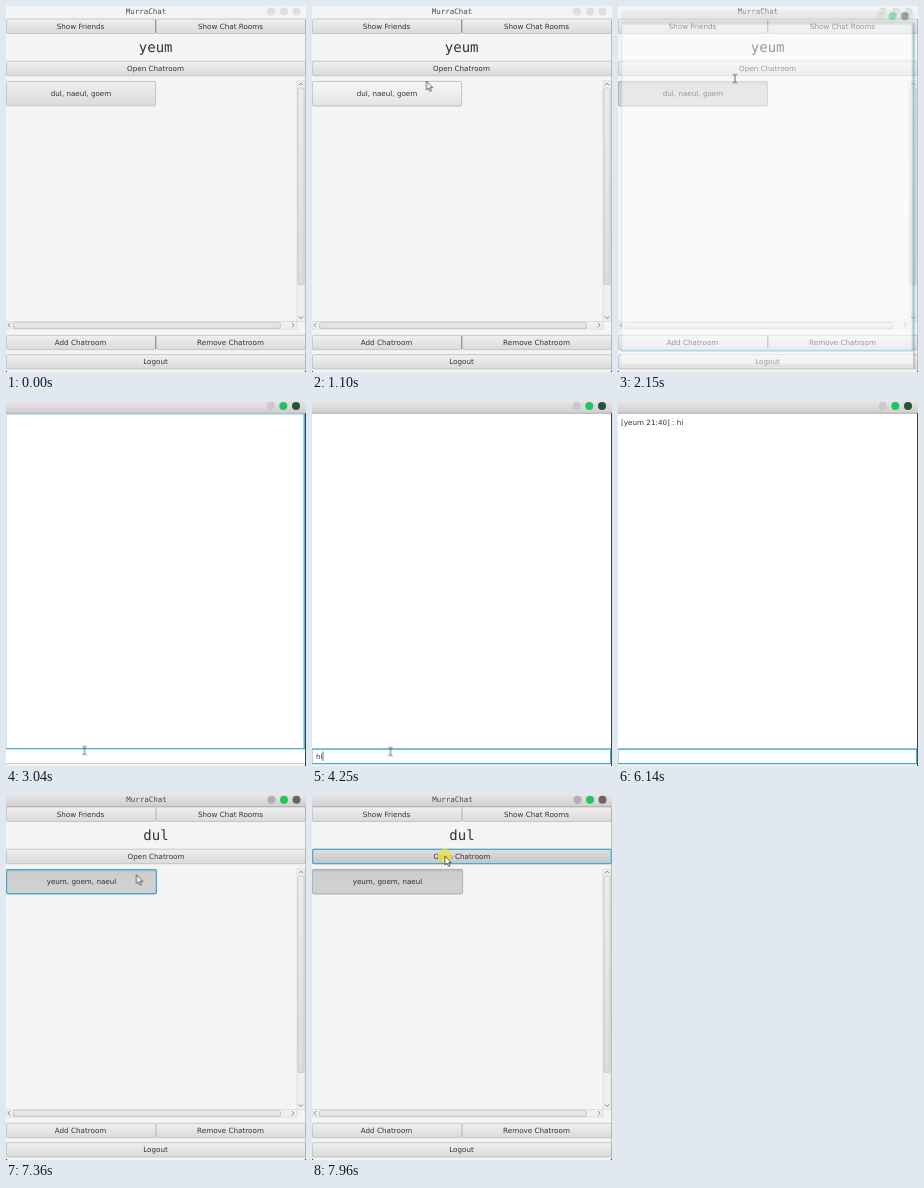
Recreate the animation shown at these times as an HTML page. Size 300x366 px, loop 8000 ms.

```html
<!DOCTYPE html>
<html lang="en">
<head>
<meta charset="utf-8">
<title>Chat demo</title>
<style>
  html, body { margin: 0; width: 100%; height: 100%; overflow: hidden; background: #f4f4f4; }
  svg { display: block; width: 300px; height: 366px; }
  text { font: 7.2px "DejaVu Sans", sans-serif; fill: #333; text-rendering: geometricPrecision; }
  .mid { text-anchor: middle; }
  .title { font: 7.5px "DejaVu Sans Mono", monospace; fill: #4c4c4c; }
  .name { font: 14px "DejaVu Sans Mono", monospace; }
  .btn { fill: url(#face); stroke: #bcbcbc; stroke-width: .8; }
  .down { fill: url(#pressed); stroke: #a6a6a6; stroke-width: .8; }
  .ring { fill: none; stroke: #45a9d0; stroke-width: 1.2; }
  .thumb { fill: url(#knob); stroke: #bdbdbd; stroke-width: .7; }
  .arrows { fill: none; stroke: #8a8a8a; stroke-width: 1; }

  /* Every part shares one 8 s clock; 1% is 80 ms. */
  .flip, .move { animation: 8s infinite; }
  .flip { opacity: 0; animation-timing-function: step-end; }
  .move { animation-timing-function: linear; }

  #second { animation-name: second; }
  #chat { animation-name: chat; transform-origin: 150px 183px; }
  #cursor { animation-name: path; }
  .active1 { animation-name: active1; }
  .hover1 { animation-name: hover1; }
  .sel1 { animation-name: sel1; }
  .selring1 { animation-name: selring1; }
  .open1 { animation-name: open1; }
  .sel2 { animation-name: sel2; }
  .selring2 { animation-name: selring2; }
  .open2 { animation-name: open2; }
  .area { animation-name: area; }
  .field { animation-name: field; }
  .caret { animation-name: caret; }
  .h { animation-name: h; }
  .i { animation-name: i; }
  .sent { animation-name: sent; }
  .click { animation-name: click; }
  .arrow { animation-name: arrow; }
  .beam { animation-name: beam; }

  @keyframes second { 0% { opacity: 0 } 77% { opacity: 1 } }
  @keyframes active1 { 0% { opacity: 0 } 16.25% { opacity: 1 } 25.75% { opacity: 0 } }
  @keyframes hover1 { 0% { opacity: 0 } 10% { opacity: 1 } 16.25% { opacity: 0 } }
  @keyframes sel1 { 0% { opacity: 0 } 16.25% { opacity: 1 } }
  @keyframes selring1 { 0% { opacity: 0 } 16.25% { opacity: 1 } 23.125% { opacity: 0 } }
  @keyframes open1 { 0% { opacity: 0 } 23.125% { opacity: 1 } 25.75% { opacity: 0 } }
  @keyframes sel2 { 0% { opacity: 0 } 89.875% { opacity: 1 } }
  @keyframes selring2 { 0% { opacity: 0 } 89.875% { opacity: 1 } 98.5% { opacity: 0 } }
  @keyframes open2 { 0% { opacity: 0 } 98.5% { opacity: 1 } }
  @keyframes area { 0% { opacity: 1 } 40% { opacity: 0 } }
  @keyframes field { 0% { opacity: 0 } 40% { opacity: 1 } }
  @keyframes h { 0% { opacity: 0 } 49.5% { opacity: 1 } 58.25% { opacity: 0 } }
  @keyframes i { 0% { opacity: 0 } 53.125% { opacity: 1 } 58.25% { opacity: 0 } }
  @keyframes sent { 0% { opacity: 0 } 58.25% { opacity: 1 } }
  @keyframes caret {
    0% { opacity: 0; transform: none }
    40% { opacity: 1; transform: none }
    46.25% { opacity: 0; transform: none }
    49.5% { opacity: 1; transform: translateX(4.6px) }
    53.125% { opacity: 1; transform: translateX(6.6px) }
    58.25% { opacity: 1; transform: none }
    64.5% { opacity: 0; transform: none }
    70.625% { opacity: 1; transform: none }
    76.75% { opacity: 0; transform: none }
  }
  @keyframes chat {
    0%, 25.75% { opacity: 0; transform: scale(.954) }
    28%, 77% { opacity: 1; transform: none }
    79.5%, 100% { opacity: 0; transform: scale(.954) }
  }
  @keyframes click {
    0% { opacity: 0 } 16.25% { opacity: 1 } 18.5% { opacity: 0 }
    23.125% { opacity: 1 } 25.25% { opacity: 0 }
    40% { opacity: 1 } 41.375% { opacity: 0 }
    89.875% { opacity: 1 } 91.75% { opacity: 0 } 98.5% { opacity: 1 }
  }
  @keyframes arrow { 0% { opacity: 1 } 26.25% { opacity: 0 } 77% { opacity: 1 } }
  @keyframes beam { 0% { opacity: 0 } 26.25% { opacity: 1 } 77% { opacity: 0 } }
  @keyframes path {
    0%, .375% { transform: translate(306px, 350px) }
    5% { transform: translate(205px, 205px) }
    10.375% { transform: translate(119px, 84px) }
    13.75% { transform: translate(114.5px, 75px) }
    15.625%, 17.5% { transform: translate(112px, 84px) }
    21.25%, 24.375% { transform: translate(117px, 64px) }
    26.875%, 31.5% { transform: translate(117px, 72.5px) }
    37.5%, 38.5% { transform: translate(78.5px, 350.5px) }
    38.75%, 64.5% { transform: translate(78.5px, 351.5px) }
    67.5% { transform: translate(128px, 374px) }
    77.5% { transform: translate(160px, 374px) }
    81.25% { transform: translate(141px, 140px) }
    83.625% { transform: translate(135.5px, 33.5px) }
    85% { transform: translate(135px, 36px) }
    88.75%, 91.25% { transform: translate(130px, 84px) }
    96.25%, 100% { transform: translate(133px, 62px) }
  }
</style>
</head>
<body>
<svg viewBox="0 0 300 366">
  <defs>
    <linearGradient id="face" x2="0" y2="1"><stop stop-color="#f0f0f0"/><stop offset="1" stop-color="#dadada"/></linearGradient>
    <linearGradient id="light" x2="0" y2="1"><stop stop-color="#f7f7f7"/><stop offset="1" stop-color="#e4e4e4"/></linearGradient>
    <linearGradient id="pressed" x2="0" y2="1"><stop stop-color="#bdbdbd"/><stop offset=".15" stop-color="#cecece"/><stop offset="1" stop-color="#d2d2d2"/></linearGradient>
    <linearGradient id="held" x2="0" y2="1"><stop stop-color="#dedede"/><stop offset="1" stop-color="#c6c6c6"/></linearGradient>
    <linearGradient id="bar" x2="0" y2="1"><stop stop-color="#e9e7e9"/><stop offset="1" stop-color="#cfcdcf"/></linearGradient>
    <linearGradient id="knob" x2="0" y2="1"><stop stop-color="#ededed"/><stop offset="1" stop-color="#dcdcdc"/></linearGradient>

    <g id="panel">
      <rect width="300" height="366" fill="#f4f4f4"/>
      <g fill="#dedede"><circle cx="265" cy="5.5" r="4"/><circle cx="278" cy="5.5" r="4"/><circle cx="290.5" cy="5.5" r="4"/></g>
      <g class="btn">
        <rect x=".4" y="13" width="149.4" height="14.5" rx="1.5"/>
        <rect x="150.2" y="13" width="149.4" height="14.5" rx="1.5"/>
        <rect x=".4" y="55.2" width="299.2" height="14.5" rx="1.5"/>
        <rect x=".4" y="329.3" width="149.4" height="14.4" rx="1.5"/>
        <rect x="150.2" y="329.3" width="149.4" height="14.4" rx="1.5"/>
        <rect x=".4" y="348.6" width="299.2" height="14.4" rx="1.5"/>
      </g>
      <g fill="#efefef" stroke="#d6d6d6" stroke-width=".7">
        <rect x="291" y="75" width="8" height="240.5"/>
        <rect x="0" y="315.5" width="291" height="7.5"/>
      </g>
      <rect class="thumb" x="292" y="82" width="6" height="196.5" rx="1.5"/>
      <rect class="thumb" x="7.5" y="316.5" width="267" height="6" rx="1.5"/>
      <path class="arrows" d="M292.8 79.2l2.2-2 2.2 2M292.8 310.5l2.2 2 2.2-2M4.2 317l-2 2.2 2 2.2M286 317l2 2.2-2 2.2"/>
      <path d="M299.5 13V366" stroke="#aaa" stroke-width=".7"/>
      <path d="M0 364.5L1.5 366H0zM300 364.5L298.5 366H300z" fill="#333"/>
      <g class="mid">
        <text x="74.5" y="22.9">Show Friends</text>
        <text x="224.5" y="22.9">Show Chat Rooms</text>
        <text x="74.5" y="339.1">Add Chatroom</text>
        <text x="224.5" y="339.1">Remove Chatroom</text>
        <text x="149.5" y="358.4">Logout</text>
      </g>
    </g>

    <g id="active">
      <rect width="300" height="12.5" fill="url(#bar)"/>
      <path d="M0 12.5H300" stroke="#aaa" stroke-width=".7"/>
      <circle cx="265.5" cy="5.7" r="4" fill="#b0b0b0"/>
      <circle cx="278" cy="5.7" r="4" fill="#22c45f"/>
      <circle cx="290.5" cy="5.7" r="4" fill="#666"/>
    </g>

    <g id="openDown">
      <rect class="ring" x=".6" y="55.3" width="298.8" height="14.3" rx="1" style="fill:url(#held)"/>
    </g>
  </defs>

  <g id="first">
    <use href="#panel"/>
    <path d="M149.6 13.5V27M149.6 329.5V343" stroke="#8c8c8c" stroke-width=".9"/>
    <use class="flip active1" href="#active"/>
    <use class="flip open1" href="#openDown"/>
    <rect class="btn" x=".4" y="75.4" width="149.2" height="24.4" rx="1.5"/>
    <rect class="btn flip hover1" x=".4" y="75.4" width="149.2" height="24.4" rx="1.5" style="fill:url(#light)"/>
    <rect class="down flip sel1" x=".4" y="75.4" width="149.2" height="24.4" rx="1.5"/>
    <rect class="ring flip selring1" x=".6" y="75.6" width="148.8" height="24" rx="1.5"/>
    <g class="mid">
      <text class="title" x="140" y="8">MurraChat</text>
      <text class="name" x="149.7" y="46">yeum</text>
      <text x="149.5" y="65">Open Chatroom</text>
      <text x="75" y="90.4">dul, naeul, goem</text>
    </g>
  </g>

  <g id="second" class="flip">
    <use href="#panel"/>
    <use class="flip sel2" href="#active"/>
    <use class="flip open2" href="#openDown"/>
    <rect class="btn" x=".4" y="75.4" width="150.2" height="24.4" rx="1.5"/>
    <rect class="down flip sel2" x=".4" y="75.4" width="150.2" height="24.4" rx="1.5"/>
    <rect class="ring flip selring2" x=".6" y="75.6" width="149.8" height="24" rx="1.5"/>
    <g class="mid">
      <text class="title" x="140.5" y="8">MurraChat</text>
      <text class="name" x="150" y="46">dul</text>
      <text x="150" y="65">Open Chatroom</text>
      <text x="75.5" y="90.4">yeum, goem, naeul</text>
    </g>
  </g>

  <g id="chat" class="move">
    <rect width="300" height="366" fill="#fff"/>
    <rect width="300" height="13" fill="url(#bar)"/>
    <path d="M0 13.3H300" stroke="#a5a5a5" stroke-width=".9"/>
    <circle cx="264.7" cy="6" r="4" fill="#c9c9c9"/>
    <circle cx="277.3" cy="6" r="4" fill="#1fc560"/>
    <circle cx="290" cy="6" r="4" fill="#285239"/>
    <path d="M0 348.5H299M0 363.5H299" stroke="#c4c4c4" stroke-width=".8"/>
    <rect y="364.2" width="300" height="1.8" fill="#f0f0f0"/>
    <path d="M299.5 13V366" stroke="#3c4046"/>
    <g class="flip area" fill="none">
      <path d="M.4 348V14.6H298" stroke="#a9dcea" stroke-width=".8"/>
      <path d="M298.2 14V348.6H0" stroke="#3fb0da" stroke-width="1.4"/>
    </g>
    <rect class="ring flip field" x="-.2" y="349.2" width="298.8" height="14.4"/>
    <text class="flip sent" x="3" y="24.5">[yeum 21:40] : hi</text>
    <text class="flip h" x="4" y="359">h</text>
    <text class="flip i" x="8.6" y="359">i</text>
    <path class="flip caret" d="M4.2 351.5V361" stroke="#333" stroke-width=".8"/>
  </g>

  <g id="cursor" class="move">
    <circle class="flip click" r="7" fill="#e9e04f" fill-opacity=".88"/>
    <path class="flip arrow" d="M0 0V9L2 7.1L3.5 10.3L4.9 9.7L3.5 6.6H6.2Z" fill="#fff" stroke="#3a3a3a" stroke-width=".8"/>
    <path class="flip beam" d="M-2.2-4H-.5L0-3.5L.5-4H2.2M0-3.5V3.5M-2.2 4H-.5L0 3.5L.5 4H2.2" fill="none" stroke="#555" stroke-width=".9"/>
  </g>
</svg>
</body>
</html>
```
